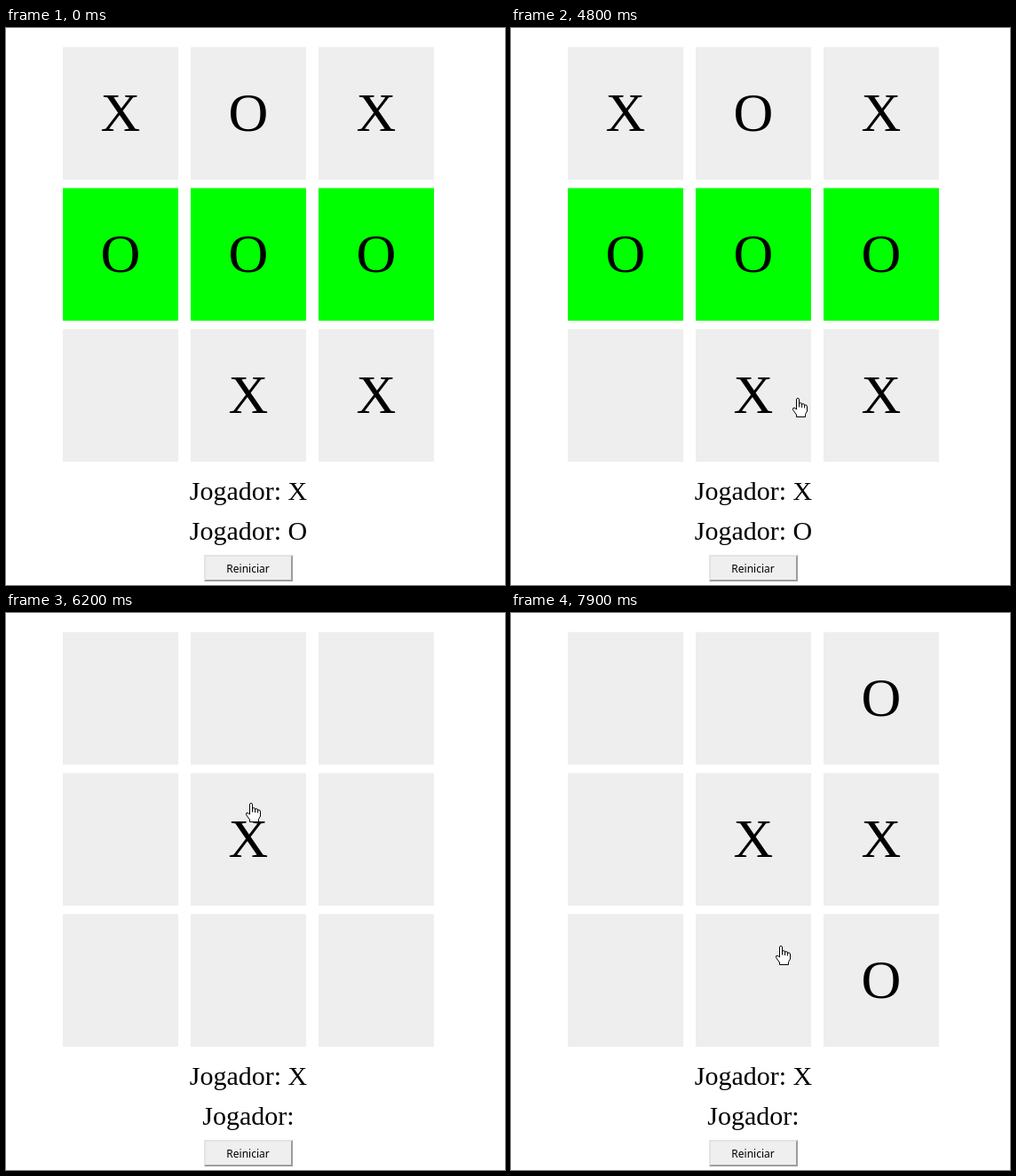
These frames come from a looping animation (562x628 px, 8 s). An HTML page:

```html
<!DOCTYPE html>
<html lang="pt">
<head>
<meta charset="utf-8">
<title>Jogo da velha</title>
<style>
  html, body { margin: 0; width: 100%; height: 100%; overflow: hidden; background: #fff; }
  svg { display: block; width: 562px; height: 628px; }
  text { text-anchor: middle; font-family: "Liberation Serif", "Times New Roman", serif; }
  .mark { font-size: 62px; }
  .label { font-size: 30px; }
  .button { font: 12px "Noto Sans", "Open Sans", sans-serif; }
  .cursor path { fill: #fff; stroke: #000; stroke-linejoin: round; }
</style>
</head>
<body>
<svg viewBox="0 0 562 628">
  <g id="board"></g>
  <text class="label" x="273" y="532">Jogador: X</text>
  <text class="label" x="273" y="577" id="winner"></text>
  <rect x="223" y="594" width="100" height="30" fill="#efefef"/>
  <path d="M223 594h100l-2 2h-96v26l-2 2z" fill="#e3e3e3"/>
  <path d="M323 594v30h-100l2-2h96v-26z" fill="#9d9d9d"/>
  <text class="button" x="272.5" y="614">Reiniciar</text>
  <g class="cursor" id="arrow">
    <path d="M.5 .5V16.5L4.2 13L6.7 18.5L9.3 17.4L6.9 12H11.5Z"/>
  </g>
  <g class="cursor" id="hand">
    <path d="M-1.5 13V1.7Q-1.5 .5 0 .5T1.5 1.7V6Q4.5 5 4.6 7Q7.4 6 7.6 8Q10.5 7.4 10.5 10V15L8.5 18.5V21.5H-1.5V19L-5.5 13.5Q-6 11 -3.8 11.2Z"/>
    <path d="M1.5 6V10.5M4.6 7V11M7.6 8V11.5" fill="none"/>
  </g>
</svg>
<script>
const LOOP = 8000, STEP = 100, RESTART = 5600;
const byId = id => document.getElementById(id);

const finished = [..."XOXOOO XX"];
const clicks = [
  { t: 6200, cell: 4 }, { t: 6700, cell: 2 }, { t: 7100, cell: 5 }, { t: 7600, cell: 8 }
];

// Pointer stops; "leave" marks the end of a rest
const stops = [
  { t: 3900, x: 508, y: 272 },
  { t: 4500, leave: 4600, x: 418, y: 350 },
  { t: 4800, x: 323, y: 417 },
  { t: 5500, leave: RESTART, x: 284, y: 613 },
  { t: 6200, x: 276, y: 214 },
  { t: 6500, leave: 6700, x: 360, y: 112 },
  { t: 6900, x: 391, y: 235 },
  { t: 7400, leave: 7600, x: 423, y: 415 },
  { t: 7900, x: 304, y: 375 }
];

function add(tag, attrs) {
  const el = document.createElementNS("http://www.w3.org/2000/svg", tag);
  for (const key in attrs) el.setAttribute(key, attrs[key]);
  return byId("board").appendChild(el);
}

const cells = finished.map((_, i) => {
  const row = Math.floor(i / 3);
  const box = { x: 64 + 144 * (i % 3), y: 21.5 + 159 * row, width: 130, height: 149.5 };
  return {
    row, box,
    rect: add("rect", box),
    mark: add("text", { class: "mark", x: box.x + 65, y: box.y + 94.5 })
  };
});
const targets = [...cells.map(c => c.box), { x: 223, y: 594, width: 100, height: 30 }];

const inside = (p, b) =>
  p.x >= b.x && p.x < b.x + b.width && p.y >= b.y && p.y < b.y + b.height;

function pointerAt(t) {
  const i = stops.findLastIndex(s => s.t <= t);
  if (i < 0) return null;
  const a = stops[i], b = stops[i + 1] || a, from = a.leave || a.t;
  const k = t > from && b !== a ? (t - from) / (b.t - from) : 0;
  const mix = axis => Math.round(a[axis] + (b[axis] - a[axis]) * k);
  return { x: mix("x"), y: mix("y") };
}

function marksAt(t) {
  if (t < RESTART) return finished;
  const marks = Array(9).fill(" ");
  clicks.forEach((c, turn) => {
    if (c.t <= t) marks[c.cell] = "XO"[turn % 2];
  });
  return marks;
}

function drawBoard(t) {
  const marks = marksAt(t);
  const winRow = [0, 1, 2].find(r => /^(XXX|OOO)$/.test(marks.slice(3 * r, 3 * r + 3).join("")));
  cells.forEach((c, i) => {
    c.rect.setAttribute("fill", c.row === winRow ? "#0f0" : "#eee");
    c.mark.textContent = marks[i].trim();
  });
  byId("winner").textContent = ("Jogador: " + (marks[3 * winRow] || "")).trim();
}

function drawPointer(t) {
  const p = pointerAt(t);
  const shape = p && (targets.some(b => inside(p, b)) ? "hand" : "arrow");
  for (const id of ["arrow", "hand"]) {
    byId(id).style.display = id === shape ? "" : "none";
    if (p) byId(id).setAttribute("transform", `translate(${p.x} ${p.y})`);
  }
}

const start = performance.now();
let last = -1;
function frame() {
  const time = (performance.now() - start) % LOOP;
  const t = Math.floor(time / STEP) * STEP;
  if (t !== last) {
    drawBoard(t);
    drawPointer(t);
    last = t;
  }
  requestAnimationFrame(frame);
}
frame();
</script>
</body>
</html>
```
